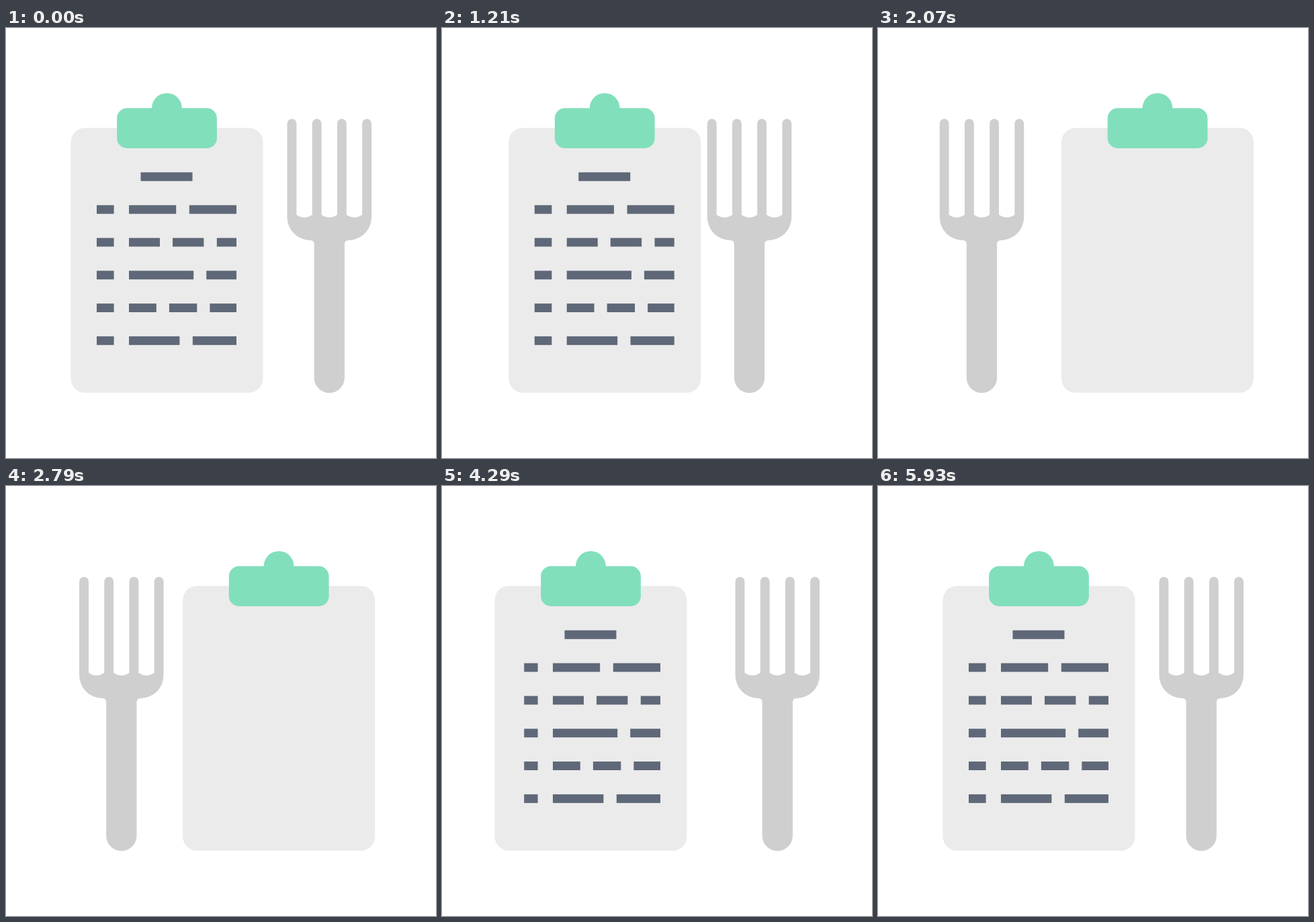
An HTML page that plays this animation: 640x640 px, repeating every 6000 ms.

```html
<!DOCTYPE html>
<html lang="en">
<head>
<meta charset="utf-8">
<title>Menu and fork</title>
<style>
  html, body { margin: 0; width: 100%; height: 100%; overflow: hidden; background: #fff; }
  svg { display: block; width: 100%; height: 100%; }
</style>
</head>
<body>
<svg viewBox="0 0 640 640">
  <defs>
    <clipPath id="rowsWipe"><rect id="rowsWindow" x="96.5" y="240" width="286" height="260"/></clipPath>
    <clipPath id="titleWipe"><rect id="titleWindow" x="128.5" y="200" width="221" height="40"/></clipPath>
  </defs>
  <g id="board">
    <rect x="96.5" y="148.7" width="286" height="394.1" rx="21" fill="#ebebeb"/>
    <g fill="#5f6878">
      <g clip-path="url(#titleWipe)"><rect x="200.5" y="214.8" width="77" height="13"/></g>
      <g id="rows" clip-path="url(#rowsWipe)"></g>
    </g>
    <g id="clip" fill="#82dfbb">
      <rect x="165.1" y="119.3" width="148.8" height="59.6" rx="15"/>
      <circle cx="239.4" cy="119.3" r="22.4"/>
    </g>
  </g>
  <path id="fork" fill="#cfcfcf"/>
</svg>
<script>
const LOOP = 6000;
const el = id => document.getElementById(id);

// Start and end of each dash after the bullet, row by row.
const rows = [
  [183, 253.2, 272.8, 343],
  [183, 229, 248, 294.4, 313.8, 343],
  [183, 279.2, 298.2, 343],
  [183, 223.8, 242.9, 284.3, 303.4, 343],
  [183, 258.4, 277.8, 343]
];
el('rows').innerHTML = rows.map((ends, i) => {
  const spans = [135, 160.6, ...ends];
  let out = '';
  for (let k = 0; k < spans.length; k += 2)
    out += `<rect x="${spans[k]}" y="${263.7 + 48.8 * i}" width="${spans[k + 1] - spans[k]}" height="12.9"/>`;
  return out;
}).join('');

const tine = 'a6.95 6.95 0 0 1 13.9 0 V278';
const valley = 'q11.65 8 23.3 0 V142.2';
el('fork').setAttribute('d',
  `M418.5 142.2 ${[tine, tine, tine, tine].join(valley)} V281.5
   A34.5 34.5 0 0 1 509.5 316 Q503.9 316 503.9 322 V520.5
   a22.65 22.65 0 0 1 -45.3 0 V322 Q458.6 316 453 316 A34.5 34.5 0 0 1 418.5 281.5 Z`);

// Symmetric cubic ease with horizontal handles of length h.
function ease(t, start, end, h = 0.5) {
  const x = Math.min(1, Math.max(0, (t - start) / (end - start)));
  let lo = 0, hi = 1;
  for (let i = 0; i < 24; i++) {
    const s = (lo + hi) / 2, r = 1 - s;
    if (3 * h * s * r * r + 3 * (1 - h) * s * s * r + s * s * s < x) lo = s; else hi = s;
  }
  return lo * lo * (3 - 2 * lo);
}

const pulse = (t, start, half) =>
  ease(t, start, start + half) - ease(t, start + half, start + 2 * half);

const scaleAt = (k, x, y) => `translate(${x} ${y}) scale(${k}) translate(${-x} ${-y})`;

function draw(t) {
  const apart = ease(t, 0, 780) - ease(t, 3990, 4870, 0.25);
  const swap = ease(t, 770, 2370) - ease(t, 2400, 3990);

  const boardX = -25.5 * apart + 214 * swap;
  const forkX = 25.5 * apart - 373 * swap;
  const wipe = 61.9 * apart - 720 * swap;

  const boardScale = 1 + 0.045 * pulse(t, 4720, 420);
  const clipScale = 1 + 0.14 * pulse(t, 4710, 560);
  const forkScale = 1 + 0.052 * pulse(t, 4880, 535);

  el('board').setAttribute('transform', `translate(${boardX} 0) ${scaleAt(boardScale, 239.5, 345.7)}`);
  el('clip').setAttribute('transform', scaleAt(clipScale, 239.5, 138));
  el('fork').setAttribute('transform', `translate(${forkX} 0) ${scaleAt(forkScale, 481.25, 339.2)}`);
  for (const id of ['rowsWindow', 'titleWindow'])
    el(id).setAttribute('transform', `translate(${wipe} 0)`);
}

const begin = performance.now();
function frame() {
  draw((performance.now() - begin) % LOOP);
  requestAnimationFrame(frame);
}
draw(0);
requestAnimationFrame(frame);
</script>
</body>
</html>
```
